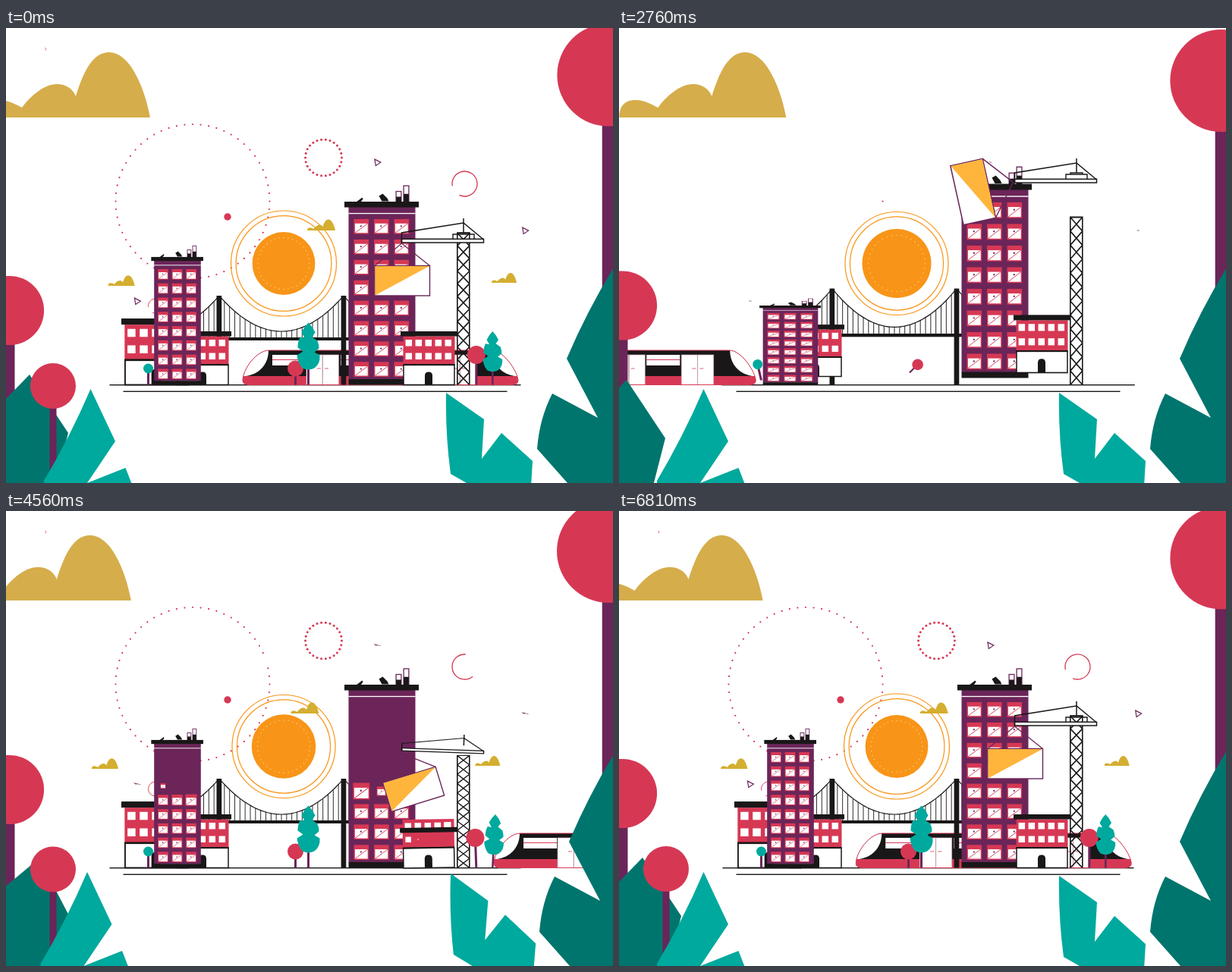
These frames come from a looping animation (800x600 px, 6840 ms). An HTML page with a canvas:

```html
<!DOCTYPE html>
<html lang="en">
<head>
<meta charset="utf-8">
<title>City</title>
<style>
html, body { margin: 0; width: 100%; height: 100%; overflow: hidden; background: #fff; }
canvas { display: block; width: 800px; height: 600px; }
</style>
</head>
<body>
<canvas id="stage" width="800" height="600"></canvas>
<script>
const LOOP = 6840, CUT = 3060; // the scene is rebuilt from nothing at CUT
const RED = '#d63854', PURPLE = '#6b2559', TEAL = '#00a99d', DARK = '#00756d',
  BLACK = '#1a1718', ORANGE = '#f89518', YELLOW = '#ffb53c', WHITE = '#fff';
const g = document.getElementById('stage').getContext('2d');
const RAD = Math.PI / 180;
let T = 0;

// Smooth value through time/value pairs, without overshooting them.
function key(...k) {
  const n = k.length / 2, t = i => k[2 * i], v = i => k[2 * i + 1];
  if (T <= t(0)) return v(0);
  if (T >= t(n - 1)) return v(n - 1);
  let i = 0;
  while (T > t(i + 1)) i++;
  const slope = j => (v(j + 1) - v(j)) / (t(j + 1) - t(j));
  const tangent = j => {
    if (j === 0 || j === n - 1) return 0;
    const a = slope(j - 1), b = slope(j);
    return a * b <= 0 ? 0 : 2 * a * b / (a + b);
  };
  const d = t(i + 1) - t(i), p = (T - t(i)) / d, q = 1 - p;
  return v(i) * (1 + 2 * p) * q * q + tangent(i) * d * p * q * q
    + v(i + 1) * p * p * (3 - 2 * p) - tangent(i + 1) * d * p * p * q;
}
const pop = start => key(start, 0, start + 130, 1.12, start + 230, 1);

function place(x, y, rot, sx, sy, draw) {
  if (Math.abs(sx) < 0.01 || Math.abs(sy) < 0.01) return;
  g.save();
  g.translate(x, y);
  g.rotate(rot * RAD);
  g.scale(sx, sy);
  draw();
  g.restore();
}
function box(color, x, y, w, h) {
  g.fillStyle = color;
  g.fillRect(x, y, w, h);
}
function frame(color, width, x, y, w, h, inside = WHITE) {
  box(inside, x, y, w, h);
  g.strokeStyle = color;
  g.lineWidth = width;
  g.strokeRect(x, y, w, h);
}
function fill(color, d) {
  g.fillStyle = color;
  g.fill(new Path2D(d));
}
function line(color, width, d) {
  g.strokeStyle = color;
  g.lineWidth = width;
  g.stroke(new Path2D(d));
}
function disc(color, x, y, r) {
  g.fillStyle = color;
  g.beginPath();
  g.arc(x, y, Math.max(r, 0), 0, 7);
  g.fill();
}
function arc(color, width, x, y, r, from = 0, to = 360) {
  if (to - from < 1 || r <= 0) return;
  g.strokeStyle = color;
  g.lineWidth = width;
  g.beginPath();
  g.arc(x, y, r, from * RAD, to * RAD);
  g.stroke();
}
function dots(color, size, x, y, r, step, from = 0, to = 359) {
  for (let a = Math.ceil(from / step) * step; a <= to; a += step)
    disc(color, x + r * Math.cos(a * RAD), y + r * Math.sin(a * RAD), size);
}

// Sky
function cloud(color, x, base, s) {
  place(x, base, 0, s, s, () => fill(color,
    'M0 0C0-16 8-23 22-23C33-23 43-17 51-13C62-28 80-44 97-44C109-44 118-38 122-28C132-60 144-86 166-86C192-86 212-43 220 0Z'));
}
function sky() {
  const age = T - LOOP;
  cloud('#d6ad4b', -30 + age * 0.011, 118, 1);

  const from = key(3350, -30, 4050, -27, 4560, -14, 5850, 0, 7700, 0, 8610, 100, 9200, 360);
  const to = key(3350, -30, 4050, 265, 4560, 338, 4800, 360);
  dots(RED, 1.1, 246, 228.5, 101.5, 6, from, Math.min(to, from + 359));
  const ring = key(3750, 0, 4050, 1.08, 4250, 1, 9000, 1, 9450, 0);
  if (ring > 0.02) dots(RED, 1.5 * ring, 418.5, 171, 24 * ring, 360 / 26);
  disc(RED, 292, 249, 4.7 * ring);

  const a = key(3950, 40, 4050, 45, 4560, 50, 5850, 95, 6840, 170, 8610, 425, 9300, 760);
  const b = key(3950, 42, 4050, 95, 4560, 275, 5850, 405, 6840, 475, 8610, 725, 9300, 760);
  arc(RED, 1.3, 604.5, 205.5, 16.5, a, b);
  arc(RED, 0.9, 197, 366.5, 9.5, a, b);
  if (T > 4200 && T < 9300) arc(RED, 0.7, 51, 28, 1.8, -80, 70);

  const flip = key(4300, 0, 4560, 0.2, 4850, 1, 9000, 1, 9600, 0.15, 9700, 0);
  const size = key(4300, 0, 4450, 1, 9200, 1, 9600, 0.4, 9700, 0);
  for (const [x, y] of [[489.5, 177], [684.3, 267], [173, 360]])
    place(x, y, 10, size, flip, () => line(PURPLE, 1.2, 'M-4.2-3.2L4.3-.6L-1.4 4.8Z'));
}
function sun() {
  const x = 366, y = 310.5;
  const r = key(3200, 0, 3600, 46, 3850, 41, 4050, 43, 4560, 42.3, 5850, 42.4,
    6840, 41.4, 8610, 42, 9400, 42, 9600, 45.5, 9850, 0);
  const ring = key(3250, 0, 3700, 73, 4050, 70, 4560, 68, 5850, 68,
    6840, 69.5, 8610, 70, 9600, 68, 9850, 0);
  disc(ORANGE, x, y, r);
  if (r > 5) dots('#ffd28a', 0.7, x, y, r * 0.82, 10);
  arc(ORANGE, 1.2, x, y, ring);
  arc(ORANGE, 1.2, x, y, ring * 0.905);
}
function smallClouds() {
  const s = key(3500, 0, 3750, 1.1, 3950, 1, 9250, 1, 9640, 0);
  const drift = (T - LOOP) * 0.0095;
  cloud('#d4ae30', 397 + drift, 267, 0.168 * s);
  cloud('#d4ae30', 134.5 + drift, 340, 0.16 * s);
  cloud('#d4ae30', 640 + drift, 336, 0.15 * s);
}

// City
function ground() {
  const s = key(3100, 0, 3600, 1.02, 3950, 1, 9350, 1, 9600, 1.005, 9850, 0);
  const low = key(3150, 0, 3700, 1.03, 4050, 1.008, 4300, 1, 9600, 1, 9850, 0);
  box(BLACK, 407.5 - 271 * s, 470, 542 * s, 1.4);
  box(BLACK, 407.5 - 253 * low, 478.6, 506 * low, 1.4);
}
function sag(x) {
  const mid = x < 281 ? 562 - x : x > 445 ? 890 - x : x;
  return -70.5 - 47 * ((mid - 363) / 82) ** 2;
}
function bridge() {
  const s = key(3300, 0, 3650, 1.06, 4050, 0.985, 4250, 1, 9350, 1, 9600, 1.08, 9800, 0);
  place(0, 470.5, 0, 1, s, () => {
    let cable = '', hangers = '';
    for (let x = 250; x <= 454; x += 2) cable += `${cable ? 'L' : 'M'}${x} ${sag(x)}`;
    for (let i = -4; i < 26; i++) {
      const x = 281 + i * 164 / 24;
      hangers += `M${x} ${sag(x)}V-62`;
    }
    line(BLACK, 1.2, cable);
    line(BLACK, 0.9, hangers);
    box(BLACK, 250, -62.5, 204, 4);
    box(BLACK, 277.5, -117.5, 6.7, 117.5);
    box(BLACK, 441.6, -117.5, 6.7, 117.5);
  });
}
function trainX() {
  const u = T - 4560, out = Math.max(0, (T - 8940) / 660);
  if (u < 0) return 643 - u * 0.9;
  return 305 + 338 * Math.exp(-0.00933 * u ** 0.78) - 488 * out ** 4;
}
function train() {
  const hull = 'M0 40Q0 45 8 45.5H355Q363 45 363 40C363 30 345 0 328 0H35C18 0 0 25 0 40Z';
  place(trainX(), 425, 0, 1, 1, () => {
    g.save();
    g.clip(new Path2D(hull));
    box(BLACK, 0, 0, 363, 34);
    box(RED, 0, 34, 363, 12);
    fill(WHITE, 'M34 0C34 20 20 32 4 34H0V0Z');
    fill(WHITE, 'M329 0C329 20 343 32 359 34H363V0Z');
    for (const x of [39, 129, 219]) {
      box(WHITE, x, 6, 44, 14);
      box(RED, x, 12, 44, 1);
    }
    for (const x of [84, 174.5, 265]) {
      frame('#c9a3ae', 0.7, x, 6, 21, 40);
      frame('#c9a3ae', 0.7, x + 21.5, 6, 21, 40);
      line(RED, 0.8, `M${x + 14} 24H${x + 19}M${x + 24} 24H${x + 29}`);
    }
    g.restore();
    line(RED, 1, hull);
  });
}
function shop(x, y, rot, s, sy, start, roofStart) {
  const grow = key(start, 0, start + 250, 1.05, start + 400, 1) * sy;
  place(x, y, rot, s, s * grow, () => {
    box(RED, -34, -64, 68, 37);
    for (let i = 0; i < 10; i++) {
      const p = pop(start + 30 + 60 * i), r = 4.25 * p;
      box(WHITE, -26.7 + 13 * (i % 5) - r, (i < 5 ? -55.2 : -37.7) - r, 2 * r, 2 * r);
    }
    frame(BLACK, 1.5, -33.5, -26.5, 67, 26.5);
    box(BLACK, -34, -27.3, 68, 2);
    fill(BLACK, 'M-5.5 0V-12Q-5.5-17 -.5-17Q4.5-17 4.5-12V0Z');
    if (T > roofStart) {
      const dy = key(roofStart, 40, roofStart + 250, -8, roofStart + 450, 0);
      box(BLACK, -37.5, -70.5 + dy, 75, 6.5);
    }
  });
}
function tower(x, y, rot, sx, sy, start, gap) {
  place(x, y, rot, sx, sy, () => {
    fill(BLACK, 'M-34-241L-30-244L-26-247L-25-245L-28-241Z');
    fill(BLACK, 'M-4-249L1-252L7-246L9-242H0Z');
    for (const [cx, h] of [[18.6, 14], [28.6, 21.5]]) {
      frame(PURPLE, 1.3, cx, -241 - h, 6.8, h);
      box(BLACK, cx, -241 - h * 0.5, 6.8, h * 0.5);
    }
    box(PURPLE, -44, -235, 88, 228);
    box(BLACK, -49.5, -241.5, 98, 7.5);
    box(WHITE, -44, -226.6, 88, 1.3);
    for (let i = 0; i < 24; i++) {
      const p = pop(start + gap * i), row = 7 - Math.floor(i / 3);
      place(-27.2 + 26.5 * (i % 3), -208.7 + 26.9 * row, 0, p, p, () => {
        box(RED, -9.8, -9.8, 19.6, 19.6);
        box(WHITE, -8.4, -4, 16.8, 12.4);
        line(RED, 0.9, 'M-8.4 8.4L8.4-4');
        disc(PURPLE, -0.5, -0.5, 1.1);
      });
    }
    box(BLACK, -44, -7.5, 88, 7.5);
  });
}
function towers() {
  const wide = key(3250, 0.7, 3600, 0.95, 3900, 1, 9300, 1, 9600, 1.18, 9750, 1.25);
  const tall = key(3250, 0, 3650, 1.1, 4050, 1.018, 4300, 1, 9300, 1, 9600, 0.62, 9750, 0);
  tower(226, 470.5, 0, 0.7 * wide, 0.698 * tall, 3540, 64);

  const dy = key(3450, -520, 4050, -18, 4250, 0, 9350, 0, 9600, -9, 9850, 0);
  const rot = key(3450, -16, 4050, -5, 4280, 1, 4450, 0);
  const stretch = key(3450, 1.2, 4050, 1.085, 4250, 0.97, 4420, 1, 9350, 1, 9600, 1.06, 9850, 0);
  tower(495.5, 470.5 + dy, rot, 1, stretch, 3790, 70);
}
function leftShops() {
  shop(198.5, 470.5, 0, 1.24, key(9200, 1, 9500, 0), 3300, 3800);
  const dy = key(9350, 0, 9600, -11, 9850, 0);
  const rot = key(3900, 0, 4050, 1.5, 4300, 0);
  shop(259.5, 470.5 + dy, rot, 1, key(9350, 1, 9600, 0.97, 9820, 0), 3740, 4100);
}
function rightShop() {
  const dy = key(9350, 0, 9600, -16, 9850, 0);
  const rot = key(4400, 0, 4560, -1, 4750, 0);
  shop(557.5, 470.5 + dy, rot, 1, key(9350, 1, 9600, 1.08, 9850, 0), 4140, 4440);
}
function crane() {
  const mast = key(4300, 0, 4560, 0.74, 4800, 1.05, 5000, 1, 9300, 1, 9600, 1.105, 9850, 0);
  place(602.8, 470.5, 0, 1, mast, () => {
    let d = 'M-8 0V-200H8V0';
    for (let i = 0; i < 12; i++) {
      const y = -i * 200 / 12, top = y - 200 / 12;
      d += `M-8 ${y}L8 ${top}M8 ${y}L-8 ${top}`;
    }
    line(BLACK, 1.6, d);
  });
  if (T < 4400) return;
  const dy = key(4400, 130, 4560, 36, 4800, -10, 5000, 0, 9350, 0, 9600, -79, 9850, -520);
  const tilt = key(4400, 6, 4560, 2, 4800, -1, 5000, 0);
  const swing = key(4400, -55, 4560, -17, 4850, 9, 5100, -4, 5350, 0, 9250, 0, 9600, 77.5, 9850, 130);
  const size = key(4400, 0.3, 4540, 1, 9300, 1, 9600, 1.1);
  place(521.5, 282 + dy, swing, size, size, () => {
    line(PURPLE, 1.3, 'M-35.5 31.5L0 2L37 31.5');
    frame(PURPLE, 1.4, -35.5, 31.5, 72.5, 39.5);
    fill(YELLOW, 'M-35 32H36.5L-35 70.5Z');
  });
  place(603, 283 + dy, tilt, 1, key(4400, 0.6, 4560, 0.75, 4800, 1), () => {
    frame(BLACK, 1.5, -81.5, -4.7, 108, 4.7);
    line(BLACK, 1.5, 'M-81.5 0V-13L0-26L26.5-4M0-32V-13');
    if (T > 4850) line(BLACK, 1.4, 'M-14-5V-11H14V-5M-8-11V-13H8V-11');
  });
}
function bush(x, y, rot, s) {
  place(x, y, rot, s, s, () => {
    box(PURPLE, -1.5, -26, 3, 26);
    fill(TEAL, 'M0-82Q6-76 9-69L5-63L12-58Q14-53 14-48L8-43L15-39Q16-28 8-22Q0-18-8-22Q-14-29-15-39L-7-44L-14-49Q-14-57-11-63L-5-62L-9-69Q-6-76 0-82Z');
  });
}
function ball(color, x, y, rot, s, trunk, r) {
  place(x, y, rot, s, s, () => {
    box(PURPLE, -1.5, -trunk - 2, 3, trunk + 2);
    disc(color, 0, -trunk - r, r);
  });
}
function cityTrees() {
  ball(TEAL, 187.5, 470.5 + key(9350, 0, 9600, -6), key(9350, 0, 9600, -13, 9800, -60),
    key(3500, 0, 3750, 1.1, 3900, 1, 9600, 1, 9780, 0), 15, 6.5);
  ball(RED, 381.5 + key(9350, 0, 9600, 1.5), 470.5 + key(3850, -30, 4050, -12, 4250, 0, 9300, 0, 9600, -16),
    key(3850, -35, 4050, -15, 4300, 5, 4450, 0, 9300, 0, 9600, 45),
    key(3850, 0, 4000, 1, 9300, 1, 9600, 0.7, 9720, 0), 11, 10.5);
  bush(398.5, 470.5 + key(3850, -25, 4050, -11, 4250, 0),
    key(3850, 130, 4050, 83, 4300, -8, 4480, 0, 9250, 0, 9550, 60),
    key(3850, 0, 4030, 1, 9250, 1, 9550, 0));
  ball(RED, 619.8, 470.5, key(4250, -40, 4560, -2, 4800, 0),
    key(4250, 0, 4500, 1, 9200, 1, 9520, 0), 27.5, 12);
  bush(641.3, 470.5, key(4300, 50, 4560, 3, 4800, 0, 9200, 0, 9520, 60),
    key(4300, 0, 4520, 0.86, 9200, 0.86, 9520, 0));
}

// Foreground plants
function plants() {
  const rise = key(3200, 650, 3750, 0, 9620, 0, 9880, 650);
  place(0, rise, 0, 1, 1, () => {
    const rightTop = key(3750, -30, 4050, -23, 4560, -9, 5000, 0, 9350, 0, 9600, 7.5);
    box(PURPLE, 785.7, 128 + rightTop, 15, 480);
    disc(RED, 794, 62 + rightTop, key(4050, 70, 4560, 68, 5000, 67.6));

    const leftTop = key(4050, 0, 4560, -5, 5000, 0, 9350, 0, 9600, -6.5);
    box(PURPLE, -2, 415 + leftTop, 13.5, 190);
    disc(RED, 4.5, 372.5 + leftTop, 45.6);

    const turn = key(3600, 20, 4050, 11.5, 4560, 6, 5100, 0);
    const away = key(9250, 0, 9600, -21, 9850, -120);
    place(26 + away + turn / 3, 560 - away / 3, turn, 1, 1, () =>
      fill(DARK, 'M5-103L56-26L34 60H-160V-230Q-80-200-43-147L-64-32Z'));

    const sprout = key(3450, 200, 3950, -9, 4050, -6.5, 4560, 0.5, 4800, 0, 9200, 0, 9520, 240);
    box(PURPLE, 57.5, 500 + sprout, 9, 120);
    disc(RED, 62, 472 + sprout, 30);

    place(key(3700, -12, 4050, -8.3, 4560, -4.5, 5100, 0), 0, 0, 1, 1, () => {
      fill(TEAL, 'M111.5 476L144 545L107 600V620H50V597Q84 540 111.5 476Z');
      fill(TEAL, 'M107 600L157.5 580L170 612H107Z');
    });

    place(key(3750, -9, 4050, -4, 4560, 3, 5000, 0), 0, 0, 1, 1, () =>
      fill(DARK, 'M806 308Q768 368 739 436L780 514L720 482Q703 515 700 555L740 600V620H810Z'));

    place(731, 771, key(3650, 8, 4050, 4.6, 4560, 1.2, 5000, 0), 1, 1, () =>
      fill(TEAL, 'M-151-290L-101-255L-104-203L-78-237L-37-200L-40-150H-90L-124-171L-145-183Q-152-235-151-290Z'));
  });
}

function draw(time) {
  const t = time % LOOP;
  T = t < CUT ? t + LOOP : t;
  box(WHITE, 0, 0, 800, 600);
  for (const part of [sky, sun, smallClouds, ground, train, bridge, leftShops,
    towers, rightShop, crane, cityTrees, plants]) part();
}

let begin;
function tick(now) {
  begin ??= now;
  draw(now - begin);
  requestAnimationFrame(tick);
}
requestAnimationFrame(tick);
</script>
</body>
</html>
```
